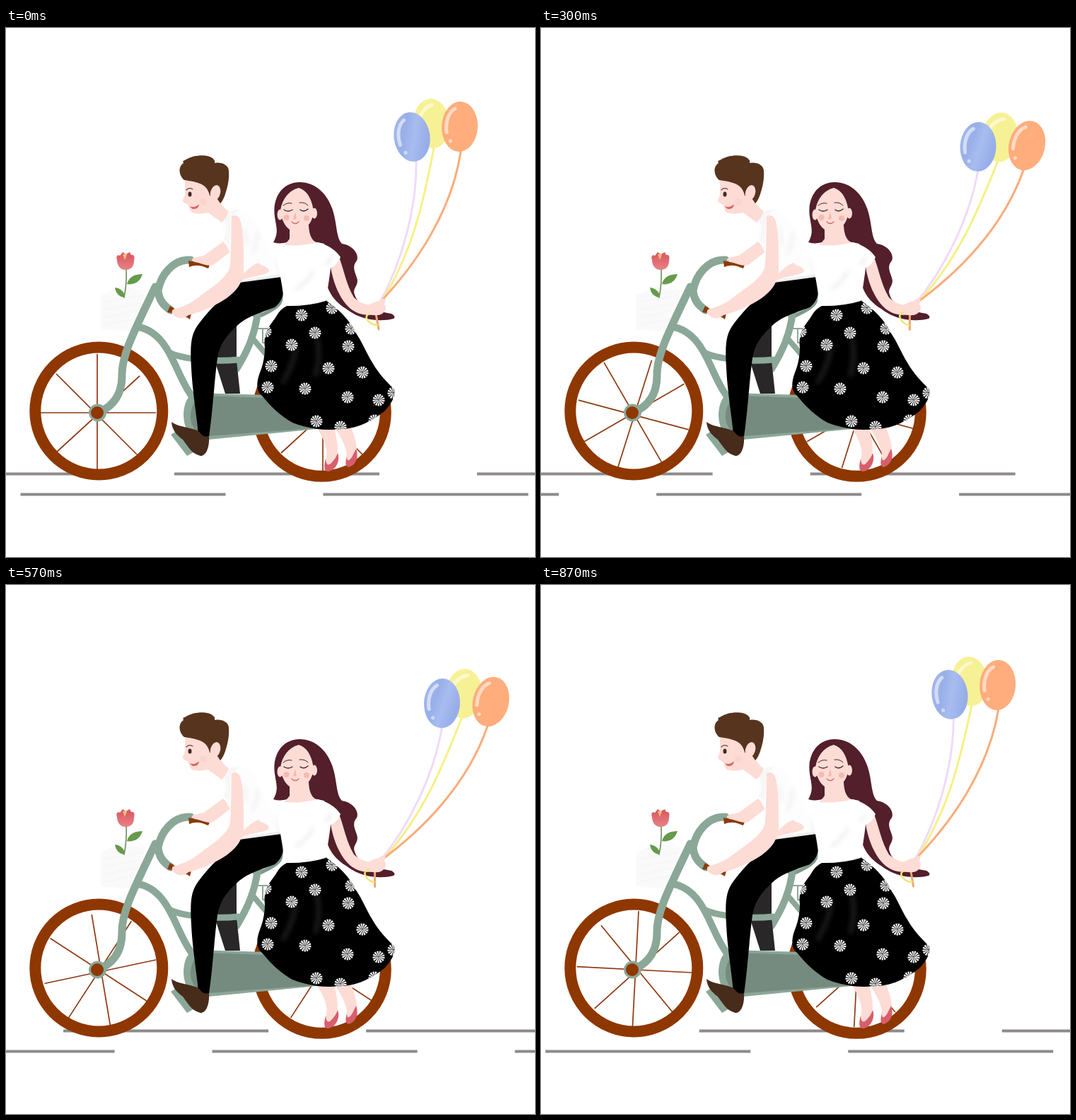
Recreate the animation shown at these times as an HTML page. Size 748 by 748 pixels, loop 900 ms.

```html
<!DOCTYPE html>
<html lang="en">
<head>
<meta charset="utf-8">
<title>Bicycle ride</title>
<style>
html, body { margin: 0; width: 100%; height: 100%; overflow: hidden; background: #fff; }
svg { display: block; width: 100vw; height: 100vh; }
.line { fill: none; stroke-linecap: round; stroke-linejoin: round; }
.skin { fill: #fddcd6; }
.rim { fill: none; stroke: #8f3700; stroke-width: 16; }
.spokes { stroke: #8d3a12; stroke-width: 1.7; }
.road { stroke: #8d8a8b; stroke-width: 4; stroke-dasharray: 290 138; }
.tube { stroke: #8ba798; }
.grip { fill: #8b3a08; }
</style>
</head>
<body>
<svg viewBox="0 0 748 748">
<defs>
  <path id="spokes" d="M-83 0H83M0-83V83M-58-55L56 59M-59 57L60-52"/>
  <circle id="daisy" r="4.600" pathLength="26" fill="none" stroke="#fff" stroke-width="7.800" stroke-dasharray="1.3 .7"/>
  <g id="shine" class="line" stroke="#fff" opacity=".55">
    <path d="M-18 9C-21-7-16-20-8-25" stroke-width="5"/>
    <circle cx="-12" cy="21" r="1" stroke-width="3"/>
  </g>
  <filter id="soft" x="-100%" width="300%"><feGaussianBlur stdDeviation="3"/></filter>
  <linearGradient id="blue" x2="1" y2=".4">
    <stop stop-color="#a6baee"/><stop offset=".4" stop-color="#98afe8"/>
    <stop offset=".65" stop-color="#a8bcf0"/><stop offset="1" stop-color="#96ade8"/>
  </linearGradient>
  <linearGradient id="petal" x2="0" y2="1">
    <stop stop-color="#d9545f"/><stop offset="1" stop-color="#e88286"/>
  </linearGradient>
  <path id="skirtShape" d="M397 393L452 385C470 397 487 414 494 430C505 446 509 459 518 473C527 489 539 501 549 511C551 520 546 530 535 542C515 558 495 566 475 567Q455 569 440 567Q420 564 405 558C389 549 375 536 362 520C350 511 357 492 361 482C364 473 366 462 366 452C363 428 376 418 382 408Q388 397 397 393Z"/>
  <clipPath id="skirtClip"><use href="#skirtShape"/></clipPath>
</defs>

<path id="roadTop" class="road" d="M-190 630.5H956"/>
<path id="roadLow" class="road" d="M-407.5 659.5H738.5"/>

<!-- wheels -->
<g id="rear" class="spokes"><use href="#spokes" x="448" y="544"/></g>
<circle class="rim" cx="446.5" cy="543.5" r="90.3"/>
<g id="front" class="spokes"><use href="#spokes" x="129" y="544"/></g>
<circle class="rim" cx="131.3" cy="541.5" r="90"/>

<!-- basket and flower -->
<path d="M134 378L163 365L197 372L184 430L134 426Z" fill="#fafafa"/>
<path class="line" stroke="#f5f5f5" d="M136 388L194 378M136 399L190 389M136 410L186 400M137 420L184 411M157 366C170 360 190 362 197 374"/>
<path class="line" d="M170 340Q171 362 167 381" stroke="#6a8f5c" stroke-width="1.6"/>
<path d="M171 362C174 351 183 348 193 348C190 358 182 364 171 362ZM168 381C159 380 155 374 154 367C162 368 168 373 168 381Z" fill="#669a4c"/>
<path d="M157 328C155 323 158 320 161 322L165 317L169 320L175 317L177 321C182 320 182 325 181 329C181 338 176 342 169 342C161 342 157 335 157 328Z" fill="url(#petal)"/>
<path d="M165 320L168 328L171 320Z" fill="#f4c36b"/>

<!-- bicycle and far leg -->
<path d="M345 405C358 406 382 398 392 377L391 386C388 397 373 403 355 412Z" fill="#7d998a"/>
<g class="line tube">
  <path d="M356 402C352 434 341 458 326 482" stroke-width="10"/>
  <path d="M347 437L370 464" stroke-width="8"/>
  <path d="M353 425H372M363 425V445H372" stroke-width="2"/>
</g>
<path d="M296 424L326 400V470L331 517H310L297 476Z" fill="#2a2729"/>
<g class="line tube">
  <path d="M188 423C208 427 221 441 231 460C243 481 250 505 264 522" stroke-width="10"/>
  <path d="M231 459C246 467 290 473 328 469" stroke-width="9"/>
  <path d="M130 544C154 534 164 516 164 492C163 464 180 431 211 366" stroke-width="11"/>
  <path d="M261 328C235 327 219 350 215 371C216 385 223 393 233 399" stroke-width="11"/>
</g>
<circle cx="129.500" cy="544" r="12.500" fill="#8ba798"/>
<circle cx="129" cy="544" r="9" fill="#8f3700"/>
<path d="M270 516L368 519L440 567L286 582C260 586 251 566 251 546C252 527 259 517 270 516Z" fill="#8ba798"/>
<path d="M282 520L370 523L415 555L436 566L287 577C268 574 260 562 261 546C263 530 270 521 282 520Z" fill="#768b7f"/>
<path d="M233 575L241 570L268 598L256 605Z" fill="#8ba798"/>

<!-- rider -->
<path class="grip" d="M258 329L288 335L286 340L278 337Q268 334 259 338Z"/>
<path class="skin" d="M307 302L319 315L293 335C284 338 275 332 263 329C262 323 272 325 281 321Z"/>
<path d="M306 266L328 255C344 257 356 275 366 300L391 351L331 358L318 320L308 300Z" fill="#fdfdfd"/>
<path d="M307 267Q318 255 329 257L318 270L316 306L308 299Q315 285 307 267Z" fill="#f7f7f7"/>
<g class="line" stroke="#f0f0f0" stroke-width="4" filter="url(#soft)">
  <path d="M355 290Q356 307 349 318M385 325L388 350M337 285L340 305"/>
</g>
<path d="M331 357L390 348V355L331 361Z" fill="#ededed"/>
<path d="M330 360L390 352C395 370 393 385 380 395C362 402 343 407 330 418C312 434 302 447 299 467C295 495 292 545 287 578L272 580C272 561 264 522 262 480C260 445 262 433 272 419C287 398 309 378 330 360Z"/>
<path d="M234 557C243 564 258 564 270 569C276 571 276 580 287 577C288 591 284 605 275 605C262 602 257 591 250 582C241 575 235 569 234 557Z" fill="#472b1b"/>
<path class="grip" d="M232 393L240 398L262 404L260 412Q248 404 228 402Z"/>
<path class="skin" d="M319 266Q329 262 332 274C337 292 336 325 336 344C334 362 326 371 312 382C296 393 275 402 258 406Q248 414 240 408Q232 404 236 398C252 394 265 387 277 377C297 363 317 349 317 333C319 310 318 288 319 266Z"/>
<path class="skin" d="M329 354C338 345 347 335 357 332C360 337 372 336 372 344C368 350 348 350 333 357Z"/>
<path class="skin" d="M280 257L305 275Q312 268 315 259Q305 253 301 241Z"/>
<path class="skin" d="M253 214L292 215L304 236C300 250 291 261 280 262Q270 264 263 261Q259 258 259 252L256 249Q249 246 250 243L253 236Z"/>
<path d="M252 215C244 208 243 196 251 191Q249 187 253 187C263 179 285 178 292 184Q296 187 295 191C305 189 315 194 315 202C316 215 313 226 310 235Q307 244 303 248L297 239L288 237Q286 228 281 224C274 218 263 217 252 215Z" fill="#57341e"/>
<ellipse class="skin" cx="296" cy="233" rx="7" ry="11" transform="rotate(15 296 233)"/>
<path class="line" d="M255 229Q259 225 264 228" stroke="#6c4634" stroke-width="1.2"/>
<ellipse cx="260" cy="235" rx="2.500" ry="3.500" fill="#432a22"/>
<path d="M259 252Q267 255 273 249Q272 257 264 256Z" fill="#dd6661"/>
<circle cx="279" cy="246" r="5" fill="#fbcfc8" opacity=".6"/>

<!-- passenger -->
<path d="M415 218C440 218 457 238 463 261C468 278 467 297 475 305C490 307 500 320 496 329C489 337 493 344 496 353C500 364 489 368 493 377C498 394 519 400 545 404Q552 408 548 411C528 416 501 413 481 397C460 384 449 364 453 342L450 305L409 297Q393 308 378 303C386 289 382 281 380 267C376 240 391 218 415 218Z" fill="#521f2b"/>
<path class="skin" d="M401 280L401 298Q396 305 392 307Q415 316 441 304Q429 301 428 279Z"/>
<ellipse class="skin" cx="387.500" cy="264" rx="4" ry="7.500"/>
<ellipse class="skin" cx="436" cy="262" rx="4" ry="7.500"/>
<path class="skin" d="M414 226C398 230 390 244 388 258C389 273 398 288 410 288C424 288 433 275 435 260C433 244 427 230 414 226Z"/>
<g class="line" stroke="#432326" stroke-width="1.4">
  <path d="M392 251Q398 246 404 248M415 247Q423 246 427 251" stroke-width="1"/>
  <path d="M393 257Q399 261 405 257M416 257Q421 261 427 256"/>
  <path d="M404 274Q409 279 414 274" stroke="#dc6b68"/>
</g>
<path d="M409 260L406 270Q409 272 411 269Z" fill="#f7b9af"/>
<g fill="#f8b9b0"><circle cx="396.500" cy="268" r="4"/><circle cx="425" cy="269" r="4"/></g>
<g class="skin">
  <path d="M440 566L464 566Q471 592 468 605L457 623Q449 620 453 606Q456 592 440 566Z"/>
  <path d="M465 566L488 565C493 578 497 590 496 602L486 617Q479 614 482 602Q479 585 465 566Z"/>
</g>
<path d="M452 609Q453 623 461 614Q466 609 469 601C473 611 467 625 456 627Q447 628 452 609ZM482 606Q482 616 489 607L495 595C500 609 493 619 484 621Q478 619 482 606Z" fill="#d85e6c"/>
<use href="#skirtShape"/>
<g clip-path="url(#skirtClip)">
  <g class="line" stroke="#fff" stroke-width="7" opacity=".1" filter="url(#soft)">
    <path d="M410 450Q407 475 392 500M440 440Q445 465 438 490"/>
  </g>
  <g id="daisies"></g>
</g>
<path class="skin" d="M458 330L471 324C478 342 481 363 492 381Q502 391 517 392L522 405Q503 408 490 399C472 386 461 358 458 330Z"/>
<path d="M380 306Q416 310 441 303Q463 309 473 324Q469 335 459 339C457 357 454 374 452 386Q426 394 393 393C393 370 386 346 380 306Z" fill="#fff"/>
<g class="line" stroke="#ececec" stroke-width="4" filter="url(#soft)">
  <path d="M434 345Q425 360 411 369M460 325L452 334"/>
</g>

<!-- balloons, swung around the hand -->
<g id="balloons">
  <g class="line" stroke-width="3">
    <path d="M580 187C581 255 560 332 526 393" stroke="#f0dafa"/>
    <path d="M605 170C591 242 576 318 526 395" stroke="#f6f088"/>
    <path d="M643 175C630 260 580 335 524 393" stroke="#fbab7b"/>
    <path d="M523 404L527 426" stroke="#f3a56e"/>
    <path d="M522 404C512 402 507 407 511 413Q516 420 525 420" stroke="#f3e576" stroke-width="2.500"/>
  </g>
  <g transform="translate(602 135) rotate(-6)">
    <ellipse rx="25.500" ry="35" fill="#f7f195"/><use href="#shine" transform="rotate(25)"/>
  </g>
  <g transform="translate(641.500 139.500) rotate(3)">
    <ellipse rx="25.500" ry="35.500" fill="#ffad7d"/><use href="#shine"/>
  </g>
  <g transform="translate(574 154) rotate(-8)">
    <ellipse rx="25.500" ry="35" fill="url(#blue)"/><use href="#shine"/>
  </g>
</g>
<path class="skin" d="M512 392Q521 387 527 386Q533 380 537 384L535 390Q540 398 532 404Q526 408 514 405Z"/>
</svg>
<script>
const LOOP = 900, STEP = 30, PEAK = 420, SWING = 15, TRAVEL = 428;
const el = id => document.getElementById(id);
const move = (id, transform) => el(id).setAttribute('transform', transform);

const daisies = [
  [418, 406], [461, 396], [437, 431], [404, 448], [488, 425], [484, 450],
  [375, 478], [456, 481], [504, 487], [423, 510], [370, 508], [483, 522],
  [527, 526], [439, 556], [473, 564], [367, 429], [521, 555], [548, 516]
];
el('daisies').innerHTML = daisies.map(([x, y]) => `<use href="#daisy" x="${x}" y="${y}"/>`).join('');

function draw() {
  const t = Math.floor(performance.now() % LOOP / STEP) * STEP;
  const p = t / LOOP;
  const swing = t < PEAK ? t / PEAK : (LOOP - t) / (LOOP - PEAK);
  move('roadTop', `translate(${p * TRAVEL})`);
  move('roadLow', `translate(${p * TRAVEL})`);
  move('front', `rotate(${-90 * p} 131.3 541.5)`);
  move('rear', `rotate(${-90 * p} 446.5 543.5)`);
  move('balloons', `rotate(${SWING * swing} 522 396)`);
  requestAnimationFrame(draw);
}
draw();
</script>
</body>
</html>
```
